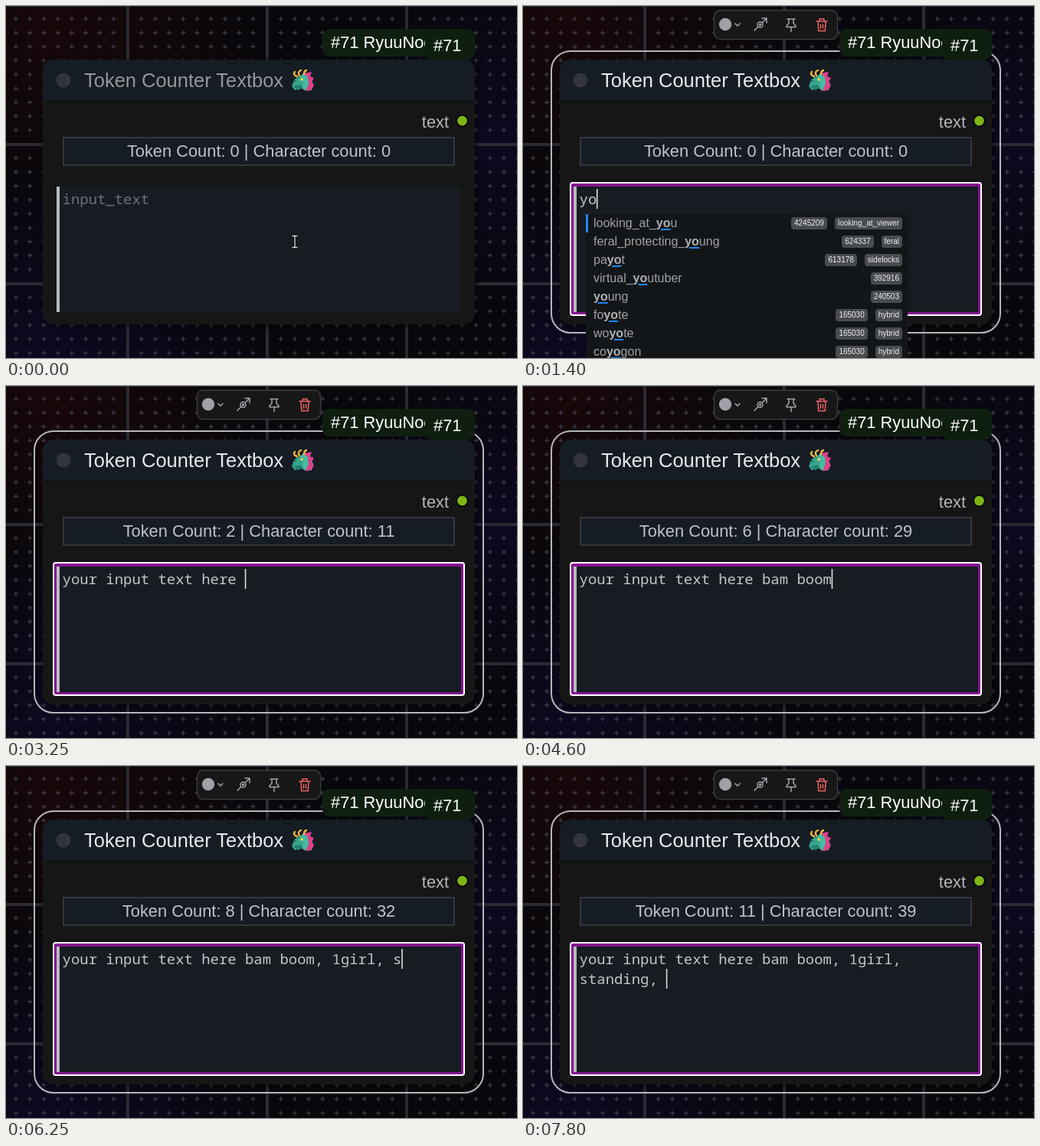
An HTML page for the animation above (8000 ms loop, 667 by 460 pixels).

```html
<!DOCTYPE html>
<html lang="en">
<head>
<meta charset="utf-8">
<title>Token counter textbox</title>
<style>
  html, body { margin: 0; width: 100%; height: 100%; overflow: hidden; background: #08070c; }
  #stage { position: relative; width: 667px; height: 460px; overflow: hidden; font-family: "Liberation Sans", Arial, sans-serif; }
  svg { position: absolute; left: 0; top: 0; }
  .mono { font: 18.93px "Noto Sans Mono", monospace; }
  #popup { position: absolute; top: 272px; height: 200px; background: #131619; color: #a0a1a3; font-size: 16px; overflow: hidden; }
  .row { display: flex; align-items: center; height: 24px; line-height: 24px; padding: 0 7px 0 10px; white-space: nowrap; }
  .row:first-child { box-shadow: inset 3px 0 #1e87f5; }
  .row b { color: #aeb0b2; text-decoration: underline 2px #1e87f5; text-underline-offset: 2px; }
  .tag { flex: 1 0 auto; }
  .chip { margin-left: 10px; padding: 0 4px; height: 16px; line-height: 16px; border-radius: 4px; background: #484b50; color: #f0f0f0; font-size: 10px; }
  .bar { position: absolute; right: 1px; top: 2px; width: 3px; height: 126px; border-radius: 2px; background: #595b5e; }
</style>
</head>
<body>
<div id="stage">
  <svg width="667" height="460" viewBox="0 0 667 460">
    <defs>
      <radialGradient id="red"><stop stop-color="#170709"/><stop offset="1" stop-color="#170709" stop-opacity="0"/></radialGradient>
      <radialGradient id="violet"><stop stop-color="#0d0820"/><stop offset="1" stop-color="#0d0820" stop-opacity="0"/></radialGradient>
      <filter id="shadow" x="-10%" y="-10%" width="120%" height="125%"><feDropShadow dx="3" dy="3" stdDeviation="5" flood-color="#000" flood-opacity=".6"/></filter>
      <clipPath id="badgeClip"><rect x="413" y="30" width="135" height="36"/></clipPath>
    </defs>

    <rect width="667" height="460" fill="#08070c"/>
    <ellipse cx="60" cy="20" rx="300" ry="240" fill="url(#red)"/>
    <ellipse cx="60" cy="440" rx="300" ry="230" fill="url(#violet)"/>
    <ellipse cx="640" cy="180" rx="220" ry="220" fill="url(#violet)"/>
    <path id="crosses" stroke="#36363f" stroke-width="1.6"/>
    <path d="M159 0V460M341 0V460M523 0V460M0 -1H667M0 181H667M0 363H667" stroke="#2b2b34" stroke-width="4"/>

    <rect x="48" y="70" width="564" height="346" rx="14" fill="#131619" filter="url(#shadow)"/>
    <path d="M48 124V84a14 14 0 0 1 14-14H598a14 14 0 0 1 14 14V124Z" fill="#161c23"/>
    <path d="M48 124.5H612" stroke="#0f1215" stroke-width="2"/>
    <rect id="outline" x="37" y="59" width="586" height="368" rx="25" fill="none" stroke="#b6b6ba" stroke-width="2"/>

    <g font-size="21.84" fill="#fff">
      <rect x="413" y="30" width="160" height="36" rx="9" fill="#0f1f0f"/>
      <text x="424" y="55" clip-path="url(#badgeClip)">#71 RyuuNoodles</text>
      <rect x="547" y="30" width="65" height="40" rx="9" fill="#0f1f0f"/>
      <text x="558" y="59">#71</text>
    </g>

    <circle cx="75" cy="97" r="9.5" fill="#33353c"/>
    <text id="title" x="102" y="106" font-size="25.48">Token Counter Textbox</text>
    <g>
      <path d="M376 97q3-4 8-5l8-3 6 5 3 8-2 8-8 1-6-4-8 3-4-5Z" fill="#36a58c"/>
      <path d="M389 88l10-2-2 6 5 2-3 5 3 5-4 6-7 1q3-8-1-13Z" fill="#e0418c"/>
      <path d="M384 92l4-4 6 5 1 9-4 8-4-3 1-8Z" fill="#45bda0"/>
      <path d="M380 92q-6-2-3-6m6 5q-3-5 2-7m4 5q0-4 3-5" fill="none" stroke="#f2b843" stroke-width="2.4" stroke-linecap="round"/>
      <path d="M375 105l9-2 4 4-7 3Z" fill="#238071"/>
      <circle cx="386" cy="96" r="1.8" fill="#f5d34e"/>
      <path d="M374 99l3-3 2 3Z" fill="#1d6b61"/>
    </g>

    <text x="578" y="159" font-size="21.84" fill="#b4b6ba" text-anchor="end">text</text>
    <circle cx="595.5" cy="150" r="7.3" fill="#7eb512" stroke="#000" stroke-width="1.8"/>
    <rect x="75" y="172" width="510" height="36" fill="#161c23" stroke="#33363d" stroke-width="2"/>
    <text id="count" x="330" y="197" font-size="21.84" fill="#c0c3c9" text-anchor="middle"></text>

    <g id="focus">
      <rect x="61" y="230" width="538" height="175" rx="4" fill="#fff"/>
      <rect x="63" y="232" width="534" height="171" rx="2" fill="#84108f"/>
    </g>
    <rect x="66" y="236" width="528" height="164" fill="#161c22"/>
    <rect x="66" y="236" width="4" height="164" fill="#b9bbbe"/>
    <text id="line0" class="mono" x="73.6" y="259"></text>
    <text id="line1" class="mono" x="73.6" y="285" fill="#c3c6ca"></text>
    <rect id="caret" width="1.6" height="26" fill="#dcdee0"/>
    <g id="pointer" fill="none">
      <path d="M373.5 300.5h7M373.5 315.5h7M377 300.5v15" stroke="#000" stroke-width="3"/>
      <path d="M373.5 300.5h7M373.5 315.5h7M377 300.5v15" stroke="#e4e4e4" stroke-width="1.3"/>
    </g>

    <g id="toolbar" fill="none" stroke="#a3a3aa" stroke-width="1.5" stroke-linecap="round" stroke-linejoin="round">
      <rect x="249.5" y="5.5" width="161" height="38" rx="8" fill="#171718" stroke="#3b3b41"/>
      <circle cx="264" cy="24" r="8.2" fill="#a0a0a8" stroke="none"/>
      <path d="M277 23l3 3 3-3"/>
      <path d="M302 32l4.500-4.500M312.500 21.500L318 16M312 16h6v6"/>
      <circle cx="309.500" cy="24.500" r="3.500"/>
      <circle cx="309.500" cy="24.500" r="1" fill="#a3a3aa"/>
      <path d="M345 17h10M347 17v5.500l-3 3.500v1.500h12v-1.500l-3-3.500v-5.500M350 27.500v6"/>
      <path d="M383 20h14M385 20l.7 12.500h8.600l.7-12.500M387 20v-3h6v3M388.500 24v5M391.500 24v5" stroke="#ee6464"/>
    </g>
  </svg>
  <div id="popup"></div>
</div>
<script>
const LOOP = 8000, SELECT = 400, FOCUS = 450, BLINK_OFF = 950;
const CHAR_W = 11.36, COLUMNS = 45;
const $ = id => document.getElementById(id);

// Each entry: time, then the characters added at that time.
const keys = [
  [1100, "y"], [1400, "o"], [1500, "u"], [1600, "r"], [1700, " "], [1800, "i"], [1900, "n"],
  [2000, "p"], [2100, "ut"], [2200, " "], [2250, "t"], [2300, "e"], [2500, "x"], [2650, "t"],
  [2800, " "], [2900, "h"], [2950, "e"], [3050, "r"], [3100, "e"], [3250, " "], [3450, "b"],
  [3600, "a"], [3700, "m"], [3850, " "], [3950, "b"], [4200, "o"], [4350, "o"], [4450, "m"],
  [4850, ","], [4900, " "], [5250, "1"], [5400, "g"], [5700, "i"], [5800, "r"], [5950, "l"],
  [6100, ","], [6150, " "], [6250, "s"], [7250, "t"], [7300, "a"], [7450, "n"], [7550, "d"],
  [7700, "ing, "]
];

const counts = [[0, 0, 0], [2100, 1, 3], [2550, 2, 11], [3700, 4, 23], [4600, 6, 29], [5550, 8, 32], [7800, 11, 39]];

const wild = "__wildcards_v5_wotakara/", sample = wild + "sampleprompt/";
const youRows = ["looking_at_you|4245209|looking_at_viewer", "feral_protecting_young|624337|feral"];
const yoRows = [...youRows, "payot|613178|sidelocks", "virtual_youtuber|392916", "young|240503",
  ...["foyote", "woyote", "coyogon"].map(tag => tag + "|165030|hybrid")];
const girlRows = ["1girl", "1girls|2580012|multiple_girls", "1boy1girl|25401|multiple_boys",
  "1girl3guys|461302|multiple_girl", wild + "1girl__",
  ...["beastmaster", "bobcut", "elfmage"].map(tail => sample + "1girl" + tail + "__")];
const sRows = ["solo|5954112", "smile|3508240", "short_hair|2665018", "shirt|2310447", "skirt|1790533",
  "simple_background|1746290", "sitting|1120386", "standing|1349705"];
const standRows = ["stand", "standng", "staning", "stadning", "standign", "standind"]
  .map(tag => tag + "|1349705|standing").concat("standing|1349705");
const staRows = ["staring_at_viewer|4245209|looking_at_viewer", ...standRows];

const popups = [
  [1400, 1500, "yo", 82, 502, yoRows],
  [1500, 1700, "you", 93, 680, [...youRows, "virtual_youtuber|392916", "young|240503", sample + "young__"]],
  [5450, 5750, "1g", 268, 773, girlRows],
  [5750, 5800, "1gi", 282, 773, girlRows],
  [5800, 5950, "1gir", 282, 773, girlRows],
  [5950, 6100, "1girl", 293, 773, girlRows],
  [6900, 7350, "s", 312, 624, sRows],
  [7350, 7450, "sta", 326, 651, staRows],
  [7450, 7550, "stan", 337, 651, standRows],
  [7550, 7700, "stand", 349, 651, standRows]
];

function rowHtml(row, query) {
  const [tag, ...chips] = row.split("|");
  return `<div class="row"><span class="tag">${tag.replace(query, "<b>$&</b>")}</span>` +
    chips.map(chip => `<span class="chip">${chip}</span>`).join("") + "</div>";
}

let shownPopup = null;
function showPopup(popup) {
  if (popup === shownPopup) return;
  shownPopup = popup;
  const box = $("popup");
  box.style.display = popup ? "block" : "none";
  if (!popup) return;
  const [, , query, left, right, rows] = popup;
  box.style.left = left + "px";
  box.style.width = right - left + "px";
  box.innerHTML = rows.map(row => rowHtml(row, query)).join("") +
    (right === 651 ? '<div class="bar"></div>' : "");
}

function wrap(text) {
  if (text.length <= COLUMNS) return [text, ""];
  const cut = text.lastIndexOf(" ", COLUMNS - 1) + 1;
  return [text.slice(0, cut), text.slice(cut)];
}

const show = (id, on) => $(id).setAttribute("visibility", on ? "visible" : "hidden");

function render(t) {
  const text = keys.filter(([at]) => at <= t).map(([, chars]) => chars).join("");
  const lines = wrap(text);
  $("line0").textContent = text ? lines[0] : "input_text";
  $("line0").setAttribute("fill", text ? "#c3c6ca" : "#6d7177");
  $("line1").textContent = lines[1];

  const lastLine = lines[1] ? 1 : 0;
  $("caret").setAttribute("x", 73.2 + lines[lastLine].length * CHAR_W);
  $("caret").setAttribute("y", 239 + lastLine * 26);
  show("caret", t >= FOCUS && !(t >= BLINK_OFF && !text));

  const [, tokens, chars] = counts.filter(([at]) => at <= t).pop();
  $("count").textContent = `Token Count: ${tokens} | Character count: ${chars}`;

  $("title").setAttribute("fill", t >= SELECT ? "#e8eaed" : "#95979b");
  show("outline", t >= SELECT);
  show("focus", t >= SELECT);
  show("toolbar", t >= FOCUS);
  show("pointer", !text);
  showPopup(popups.find(([from, to]) => t >= from && t < to));
}

let crosses = "";
for (let col = -8; col <= 28; col++) {
  for (let row = 1; row <= 25; row++) {
    if (col % 10 && row % 10) crosses += `M${158.5 + col * 18.2 - 3} ${-1.5 + row * 18.2}h6m-3 -3v6`;
  }
}
$("crosses").setAttribute("d", crosses);

const start = performance.now();
function tick() {
  render((performance.now() - start) % LOOP);
  requestAnimationFrame(tick);
}
tick();
</script>
</body>
</html>
```
